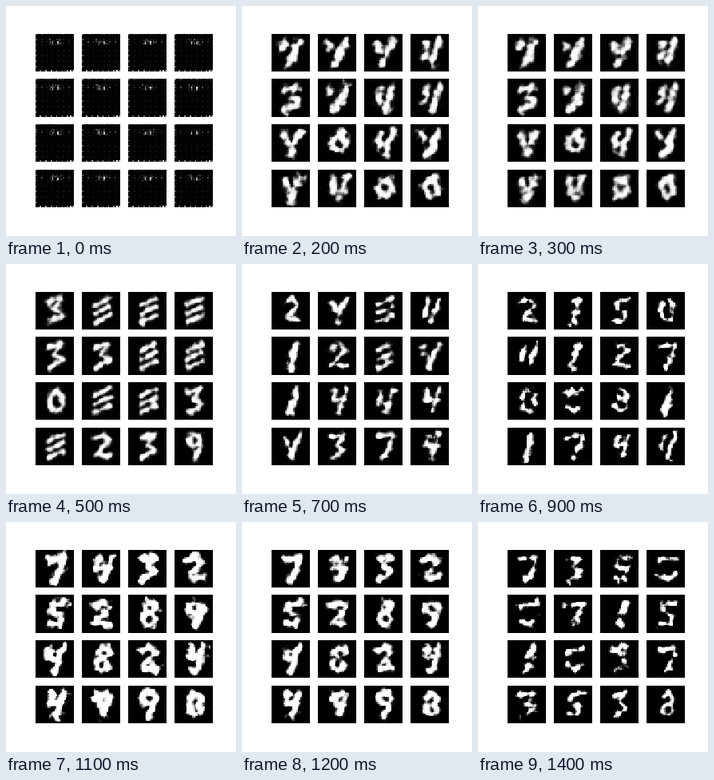
Animation of 288x288 px, one loop 1600 ms. Source, as a matplotlib script:

```python
import numpy as np
import matplotlib.pyplot as plt
from matplotlib.animation import FuncAnimation

N = 28          # cells along one tile edge
STEPS = 16
yy, xx = np.mgrid[0:N, 0:N].astype(float)


def ring(cx, cy, rx, ry):
    a = np.linspace(0, 2 * np.pi, 13)
    return list(zip(cx + rx * np.cos(a), cy + ry * np.sin(a)))


# strokes in a box 4 wide and 6 high
SHAPES = {
    "0": [ring(2, 3, 1.6, 2.6)],
    "1": [[(3, 0), (2, 3), (1.5, 6)]],
    "2": [[(0, 1), (2, 0), (3.5, 1.5), (.5, 5), (4, 5.6)]],
    "3": [[(0, .8), (3, 0), (1.5, 2.7), (3.5, 4), (.3, 6)]],
    "4": [[(1, .5), (.5, 2.8), (3.5, 2.5)], [(4, 0), (2, 6)]],
    "5": [[(4, 0), (1, .7), (1, 2.5), (3.2, 3.5), (2.5, 5.6), (.3, 5.5)]],
    "7": [[(0, .7), (4, 0), (3.2, 3), (1.5, 6)]],
    "8": [ring(2.3, 1.4, 1.2, 1.2), ring(1.9, 4.3, 1.4, 1.5)],
    "9": [ring(2, 1.6, 1.6, 1.4), [(3.6, 1.5), (2, 6)]],
    "o": [ring(2, 3, 1.7, 1.8), [(3, 0), (2, 1)]],
    "u": [[(1, .5), (.2, 4)], [(4, 0), (2, 6)]],
    "y": [[(0, 1), (1.2, 3.3)], [(4, 0), (2.3, 3), (1.5, 6)]],
    "/": [[(4, 0), (2.5, 3), (1, 6)], [(-.6, .6), (-.2, 1.6)]],
    "e": [[(0, y + 1.3), (3.6, y - .4)] for y in (.3, 2.5, 4.7)],
    "=": [[(0, .8), (4, .2)], [(0, 4.9), (2, 5.5), (4, 4.6)]],
}

# step -> shapes in the tiles, lit share, edge roughness, edge softness
LOOKS = {
    2: ("//yu 3/uu you/ yuoo", .20, .9, .45),
    5: ("3eee 33ee 0ee3 e239", .17, .6, .4),
    7: ("2yeu 12ey 14u4 y374", .13, .8, .35),
    9: ("2150 u127 0=81 174u", .11, 1.0, .25),
    11: ("7432 5289 y824 4990", .25, 1.0, .28),
    14: ("735= =715 1=37 3538", .115, 1.1, .25),
}
KEYS = sorted(LOOKS)


def distance(strokes):
    """Distance of every cell to the nearest stroke."""
    best = np.full((N, N), 99.0)
    for stroke in strokes:
        pts = np.array(stroke) * 2.8 + (9.3, 5.2)
        for (ax, ay), (bx, by) in zip(pts, pts[1:]):
            dx, dy = bx - ax, by - ay
            t = np.clip(((xx - ax) * dx + (yy - ay) * dy) / (dx * dx + dy * dy), 0, 1)
            best = np.minimum(best, np.hypot(xx - ax - t * dx, yy - ay - t * dy))
    return best


def clouds(rng):
    """Smooth noise with unit spread, for uneven stroke edges."""
    n = rng.normal(size=(N, N))
    for axis in (0, 1, 0, 1):
        n = n + np.roll(n, 1, axis) + np.roll(n, -1, axis)
    return n / n.std()


def make_fields(step):
    names, _, rough, _ = LOOKS[step]
    rng = np.random.default_rng(step)
    return [distance(SHAPES[c]) + rough * clouds(rng) for c in names.replace(" ", "")]


fields = {k: make_fields(k) for k in KEYS}


def static(rng):
    """Dark lattice of dots with two bright spots."""
    img = .02 * rng.random((N, N))
    img[::4, ::4] += .07
    img[0, ::2] += .25 * rng.random(N // 2)
    img[::4, 0] += .25
    img[-1, 3::4] = .3 + .4 * rng.random(7)
    img[-1, 25] = 1
    img[6, ::4] += .35 * rng.random(7)
    img[4:9, 10:19] += .35 * rng.random((5, 9)) ** 3
    img[6:8, [12, 16]] = .4 + .6 * rng.random((2, 2))
    return img


def tile(step, i):
    if step == 0:
        return static(np.random.default_rng(i))
    a = max((k for k in KEYS if k <= step), default=KEYS[0])
    b = min(k for k in KEYS if k >= step)
    t = (step - a) / max(b - a, 1)

    def mix(p, q):
        return (1 - t) * p + t * q

    field = mix(fields[a][i], fields[b][i])
    lit = mix(LOOKS[a][1], LOOKS[b][1])
    soft = 1.3 if step == 1 else mix(LOOKS[a][3], LOOKS[b][3])
    # a fixed lit share keeps the weight steady while shapes blend
    edge = (field - np.quantile(field, lit)) / soft
    return 1 / (1 + np.exp(np.clip(edge, -30, 30)))


fig, axes = plt.subplots(4, 4, figsize=(4, 4), dpi=72)
fig.subplots_adjust(left=.125, right=.9, bottom=.125, top=.88, wspace=.2, hspace=.2)
views = []
for ax in axes.flat:
    ax.axis("off")
    views.append(ax.imshow(np.zeros((N, N)), cmap="gray", vmin=0, vmax=1,
                           interpolation="nearest"))


def update(n):
    step = min(n, STEPS - 2)    # the last picture stays twice as long
    for i, view in enumerate(views):
        view.set_data(tile(step, i))
    return views


anim = FuncAnimation(fig, update, frames=STEPS, interval=100, repeat=True, blit=False)
plt.show()
```
